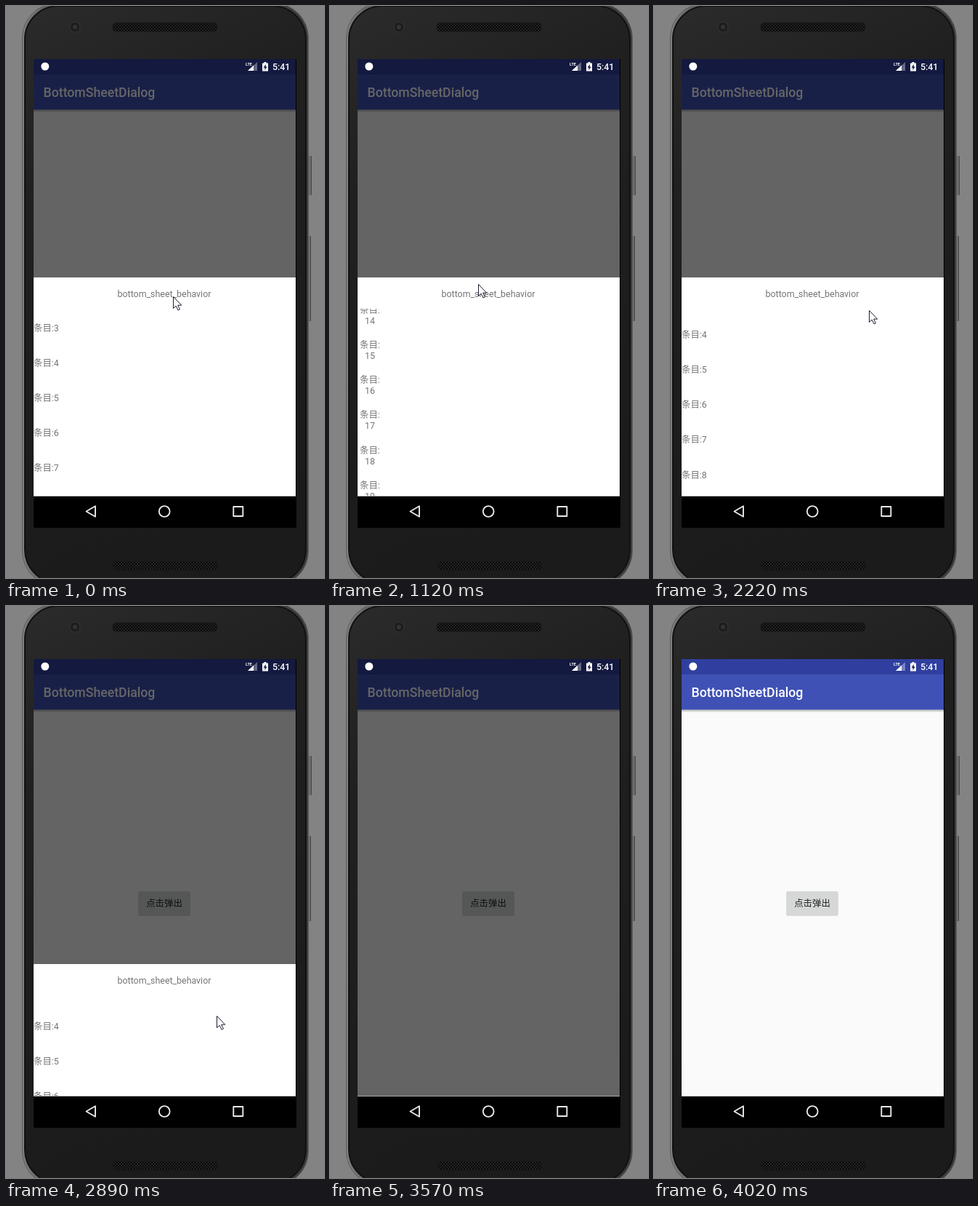
An HTML page for the animation above (4.58 s loop, 438 by 786 pixels).

```html
<!DOCTYPE html>
<html lang="zh-CN">
<head>
<meta charset="utf-8">
<title>BottomSheetDialog</title>
<style>
html, body { margin: 0; width: 100%; height: 100%; overflow: hidden; background: #838383; }
svg { display: block; }
text { font: 12.4px Roboto, 'Noto Sans CJK SC', 'Noto Sans CJK', sans-serif; }
.mid { text-anchor: middle; }
#sheet text { fill: #757575; }
</style>
</head>
<body>
<svg width="438" height="786" viewBox="0 0 438 786">
  <defs>
    <linearGradient id="body" x1="0" y1="0" x2=".25" y2="1">
      <stop offset="0" stop-color="#2b2b2c"/>
      <stop offset=".3" stop-color="#202021"/>
      <stop offset="1" stop-color="#1b1b1c"/>
    </linearGradient>
    <linearGradient id="rim">
      <stop offset="0" stop-color="#808080"/>
      <stop offset=".15" stop-color="#484848"/>
      <stop offset="1" stop-color="#3c3c3c"/>
    </linearGradient>
    <linearGradient id="shade" x2="0" y2="1">
      <stop offset="0" stop-opacity=".28"/>
      <stop offset="1" stop-opacity="0"/>
    </linearGradient>
    <pattern id="mesh" width="4" height="4" patternUnits="userSpaceOnUse">
      <rect width="4" height="4" fill="#242424"/>
      <path d="M0 0h2v2h-2zM2 2h2v2h-2z" fill="#080808"/>
    </pattern>
    <clipPath id="screen"><rect x="38" y="73" width="361" height="600.5"/></clipPath>
    <clipPath id="listBox"><rect x="38" y="416" width="361" height="400"/></clipPath>
  </defs>

  <!-- phone -->
  <path d="M416 206h4v54h-4zM416 316h3v117h-3z" fill="#6c6c6c"/>
  <path d="M420.5 206v54M419.5 316v117" stroke="#444"/>
  <rect x="22.500" y="-4" width="394" height="801" rx="48" fill="url(#rim)" stroke="#5c5c5c"/>
  <rect x="26" y="0" width="387" height="793" rx="46" fill="url(#body)" stroke="#111" stroke-width="2"/>
  <circle cx="95" cy="29" r="7" fill="#1d1d1e" stroke="#363636"/>
  <circle cx="95" cy="29" r="3" fill="#303438"/>
  <g fill="url(#mesh)" stroke="#161616">
    <rect x="147" y="23" width="144" height="12" rx="5"/>
    <rect x="147.500" y="763" width="144" height="12" rx="5"/>
  </g>
  <path d="M38 73h362v644h-362z"/>

  <g clip-path="url(#screen)">
    <path d="M38 73h361v601h-361z" fill="#fafafa"/>
    <path d="M38 73h361v21h-361z" fill="#303f9f"/>
    <path d="M38 94h361v48.500h-361z" fill="#3f51b5"/>
    <path d="M38 142.500h361v4h-361z" fill="url(#shade)"/>
    <text x="51.500" y="125" fill="#fff" style="font-size:17.700px;font-weight:500">BottomSheetDialog</text>
    <rect x="182" y="392" width="72" height="34" rx="2.500" opacity=".12"/>
    <rect x="183" y="392" width="70" height="33" rx="2" fill="#d6d7d7"/>
    <text class="mid" x="218" y="413" fill="#222">点击弹出</text>
    <path id="dim" d="M38 73h361v601h-361z"/>

    <g fill="#fff">
      <circle cx="53.800" cy="83" r="5.500"/>
      <text x="330" y="82" style="font-size:5.500px;font-weight:700">LTE</text>
      <path d="M346 77v12h-13z" opacity=".35"/>
      <path d="M341 81.600v7.400h-8z"/>
      <path d="M353 78.500h2.500v-1.500h3v1.500h2.500v11h-8z"/>
      <path d="M357.800 80l-3.300 4.800h2v3.500l3.200-4.800h-1.900z" fill="#182048"/>
      <text x="367" y="88" style="font-weight:500">5:41</text>
    </g>

    <g id="sheet">
      <path d="M38 373h361v420h-361z" fill="#fff"/>
      <text class="mid" x="218" y="400">bottom_sheet_behavior</text>
      <g clip-path="url(#listBox)"><g id="list"></g></g>
    </g>
  </g>

  <g fill="none" stroke="#e8e8e8" stroke-width="1.900" stroke-linejoin="round">
    <path d="M110.500 694.500l12.500-7.300v14.600z"/>
    <circle cx="218.200" cy="694.500" r="7.400"/>
    <rect x="313.300" y="688" width="13" height="13"/>
  </g>
  <path id="cursor" d="M.5.500v16l3.700-3.300 2.800 5.800 2.400-1.100-2.700-5.700h5z" fill="#fff" stroke="#1c1c30"/>
</svg>

<script>
const LOOP = 4580, STEP = 137.5, LEAD = 13, PITCH = 48.2, ITEMS = 30;
const $ = id => document.getElementById(id);

// Key points are [step, value, ...], joined by straight runs.
const scroll = [[0, 0], [4, 222], [5, 240], [9, 650], [11, 524], [16, 39], [18, 32]];
const sheetTop = [[18, 373], [21, 492], [23, 564], [25, 673]];
const pointer = [[0, 230, 399], [3, 231, 264], [4, 223, 483], [7, 204, 334], [9, 204, 430],
  [11, 237, 720], [12, 241, 770], [16, 296, 418], [18, 296, 384], [21, 290, 563], [25, 290, 819]];

const clamp = v => Math.min(1, Math.max(0, v));

function sample(track, step) {
  const next = track.findIndex(key => key[0] > step);
  if (next < 0) return track.at(-1).slice(1);
  const b = track[next], a = track[next - 1] || b;
  const k = a === b ? 0 : (step - a[0]) / (b[0] - a[0]);
  return a.slice(1).map((v, j) => v + (b[j + 1] - v) * k);
}

function move(id, x, y) {
  $(id).setAttribute('transform', `translate(${x} ${y})`);
}

function label(n) {
  const y = 442 + PITCH * (n - 3) + 4.5;
  return n < 10
    ? `<text x="38" y="${y}">条目:${n}</text>`
    : `<text class="mid" x="55" y="${y - 7.5}">条目:</text><text class="mid" x="55" y="${y + 7.5}">${n}</text>`;
}

$('list').innerHTML = Array.from({ length: ITEMS }, (_, n) => label(n)).join('');

function draw(time) {
  const step = Math.floor((time % LOOP + LEAD) / STEP);
  move('list', 0, -sample(scroll, step)[0]);
  move('sheet', 0, sample(sheetTop, step)[0] - 373);
  move('cursor', ...sample(pointer, step));
  $('dim').setAttribute('opacity', 0.6 * clamp((28 - step) / 2));
}

const start = performance.now();
function frame() {
  draw(performance.now() - start);
  requestAnimationFrame(frame);
}
frame();
</script>
</body>
</html>
```
